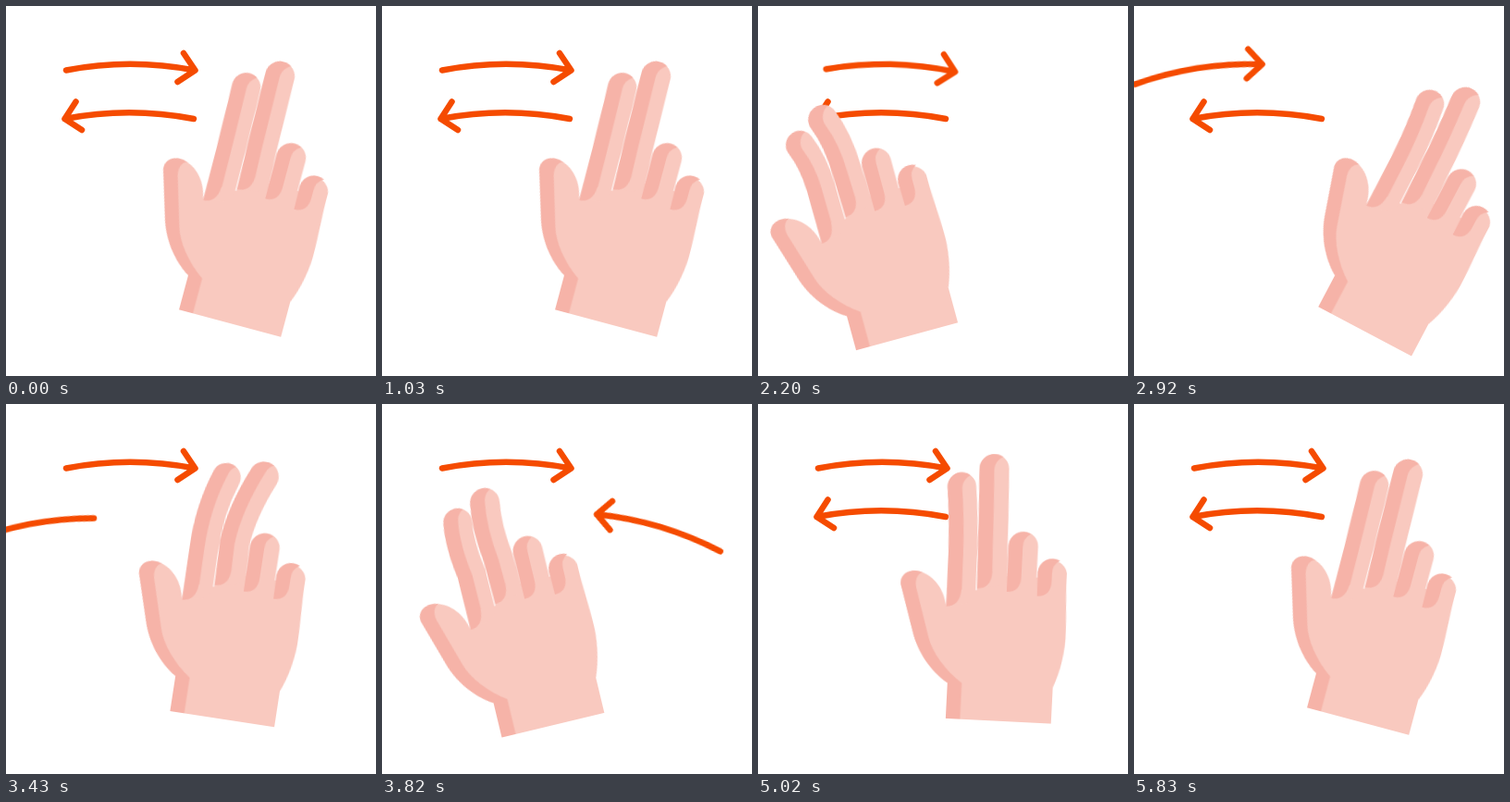
These frames come from a looping animation (400x400 px, 5860 ms). An HTML page without scripts:

```html
<!DOCTYPE html>
<html lang="en">
<head>
<meta charset="utf-8">
<title>Two-finger swipe</title>
<style>
html, body { margin: 0; width: 100%; height: 100%; overflow: hidden; background: #fff; }
svg { display: block; width: 100vw; height: 100vh; }
.light { fill: #f9c9bf; }
.dark { fill: #f6b3a8; }
.index, .middle { fill: none; stroke-linecap: round; }
.index { stroke-width: 31; }
.middle { stroke-width: 32; }
.light-line { stroke: #f9c9bf; }
.dark-line { stroke: #f6b3a8; }
.arrow { fill: none; stroke: #f54b00; stroke-width: 6.5; stroke-linecap: round; stroke-linejoin: round; }

.x, .y, .tilt, .index, .middle, .arrow { animation: 5.86s linear infinite; }
.x { animation-name: x; }
.y { animation-name: y; animation-timing-function: cubic-bezier(.35, 0, .65, 1); }
.tilt { animation-name: tilt; }
.index { animation-name: index; animation-timing-function: cubic-bezier(.3, 0, .7, 1); }
.middle { animation-name: middle; animation-timing-function: cubic-bezier(.3, 0, .7, 1); }
.right { animation-name: right; transform-origin: 130px 486px; }
.left { animation-name: left; transform-origin: 157px 696px; }

@keyframes x {
  0%, 17.58% { transform: translateX(268px); animation-timing-function: cubic-bezier(.33, 0, .5, 1); }
  35.32% { transform: translateX(128px); animation-timing-function: cubic-bezier(.4, 0, .6, 1); }
  51.88% { transform: translateX(302px); animation-timing-function: cubic-bezier(.33, 0, .5, 1); }
  72.53% { transform: translateX(128px); animation-timing-function: cubic-bezier(.5, 0, .6, 1); }
  89.76% { transform: translateX(286px); animation-timing-function: ease-in-out; }
  98.98%, 100% { transform: translateX(268px); }
}
@keyframes y {
  0%, 17.58% { transform: translateY(246.4px); }
  22.18% { transform: translateY(244px); }
  25.77% { transform: translateY(248.2px); }
  34.98% { transform: translateY(270px); }
  41.81% { transform: translateY(241px); }
  51.88% { transform: translateY(266px); }
  59.39% { transform: translateY(241px); }
  72.53% { transform: translateY(263px); }
  82.76% { transform: translateY(240px); }
  90.78% { transform: translateY(249.5px); }
  98.98%, 100% { transform: translateY(246.4px); }
}
@keyframes tilt {
  0%, 17.58% { transform: rotate(15deg); animation-timing-function: cubic-bezier(.55, 0, .7, 1); }
  34.13% { transform: rotate(-23deg); animation-timing-function: cubic-bezier(.25, 0, .55, 1); }
  51.88% { transform: rotate(29deg); animation-timing-function: cubic-bezier(.25, 0, .45, 1); }
  71.67% { transform: rotate(-20deg); animation-timing-function: cubic-bezier(.55, 0, .85, 1); }
  91.81% { transform: rotate(20deg); animation-timing-function: ease-in-out; }
  98.98%, 100% { transform: rotate(15deg); }
}
@keyframes index {
  0%, 17.58%, 98.98%, 100% { d: path("M-47-140L-47.5-180Q-48-215-49-251"); }
  25.77%, 58.87% { d: path("M-47-140L-47.5-180Q-48-222-35-259"); }
  37.54%, 80.2% { d: path("M-47-140L-47.5-180Q-48-208-57-230"); }
  42.66% { d: path("M-47-140L-47.5-180Q-48-214-61-242"); }
  49.83% { d: path("M-47-140L-47.5-180Q-48-215-53-250"); }
  65.19% { d: path("M-47-140L-47.5-180Q-53-214-49-237"); }
  72.53% { d: path("M-47-140L-47.5-180Q-49-212-52-236"); }
  85.67% { d: path("M-47-140L-47.5-180Q-48-215-52-251"); }
}
@keyframes middle {
  0%, 17.58%, 98.98%, 100% { d: path("M-14.5-160L-15.5-190Q-16-225-17-272"); }
  25.77%, 58.87% { d: path("M-14.5-160L-15.5-190Q-13-225 5-266"); }
  37.54%, 80.2% { d: path("M-14.5-160L-15.5-190Q-16-225-26-250"); }
  42.66% { d: path("M-14.5-160L-15.5-190Q-16-225-31-262"); }
  49.83% { d: path("M-14.5-160L-15.5-190Q-16-225-20-270"); }
  65.19% { d: path("M-14.5-160L-15.5-190Q-20-225-15.5-251"); }
  72.53% { d: path("M-14.5-160L-15.5-190Q-17-225-20-251"); }
  85.67% { d: path("M-14.5-160L-15.5-190Q-16-225-18-272"); }
}
@keyframes right {
  0%, 36.35% { transform: rotate(0deg); animation-timing-function: cubic-bezier(.5, 0, .9, .6); }
  43.52% { transform: rotate(52deg); animation-timing-function: step-end; }
  43.53% { transform: rotate(-33deg); animation-timing-function: cubic-bezier(.33, .67, .67, 1); }
  56.77%, 100% { transform: rotate(0deg); }
}
@keyframes left {
  0%, 53.92% { transform: rotate(0deg); animation-timing-function: cubic-bezier(.5, 0, .9, .6); }
  60.27% { transform: rotate(-24deg); animation-timing-function: step-end; }
  60.28% { transform: rotate(35deg); animation-timing-function: cubic-bezier(.33, .67, .67, 1); }
  76.28%, 100% { transform: rotate(0deg); }
}
</style>
</head>
<body>
<svg viewBox="0 0 400 400">
  <defs>
    <!-- Each mask leaves only the shaded left half of a finger -->
    <mask id="index-shade" maskUnits="userSpaceOnUse" x="-120" y="-320" width="200" height="200">
      <path fill="#fff" d="M-120-320H80V-140H-120Z"/>
      <g transform="translate(16 1)"><path class="index" stroke="#000" d="M-47-140L-47.5-180Q-48-215-49-251"/></g>
    </mask>
    <mask id="middle-shade" maskUnits="userSpaceOnUse" x="-120" y="-320" width="200" height="200">
      <path fill="#fff" d="M-120-320H80V-160H-120Z"/>
      <g transform="translate(16 1)"><path class="middle" stroke="#000" d="M-14.5-160L-15.5-190Q-16-225-17-272"/></g>
    </mask>
  </defs>

  <path class="arrow right" d="M65 69.5Q134 56 204 69.5M192 51L204.5 69.5L185.5 82"/>
  <path class="arrow left" d="M203 122Q133 108.500 63.500 122M75.500 103.500L63.500 122L82 134"/>

  <g class="x"><g class="y"><g class="tilt"><g transform="translate(0 100)">
    <path class="light" d="M-57 0V-38.600C-76-50-91-71-97-91L-112-140C-116-153-104-161-90-156.500C-74-151-65-136-62.500-121V-140H-30.500V-160H1.500V-157H66C66-140 68-115 68-100C69-80 64-55 57-39V0Z"/>
    <path class="dark" d="M-90-156.500C-104-161-116-153-112-140L-97-91C-91-71-76-50-57-38.600V0H-41.500V-39C-60-52-75-70-80-87L-96-140C-98-150-94-155-90-156.500Z"/>

    <path class="index light-line" d="M-47-140L-47.5-180Q-48-215-49-251"/>
    <g mask="url(#index-shade)"><path class="index dark-line" d="M-47-140L-47.5-180Q-48-215-49-251"/></g>
    <path class="dark" d="M-62.500-140.500H-47Q-47.500-122-62.500-121Z"/>

    <path class="middle light-line" d="M-14.5-160L-15.5-190Q-16-225-17-272"/>
    <g mask="url(#middle-shade)"><path class="middle dark-line" d="M-14.5-160L-15.5-190Q-16-225-17-272"/></g>
    <path class="dark" d="M-30.500-160.500H-14.500Q-15-142.500-30-142Z"/>

    <path class="light" d="M1.500-140V-190A16 16 0 0 1 33.500-190V-140Z"/>
    <path class="dark" d="M2-140L1.500-190A16 16 0 0 1 25-203.500A16 16 0 0 0 17-189V-157Q17-140 2-140Z"/>

    <path class="light" d="M34.500-137V-163A16 16 0 0 1 66-163V-137Z"/>
    <path class="dark" d="M35-137L34.500-163A16 16 0 0 1 58-176.500A16 16 0 0 0 50-162V-154Q50-137 35-137Z"/>
  </g></g></g></g>
</svg>
</body>
</html>
```
